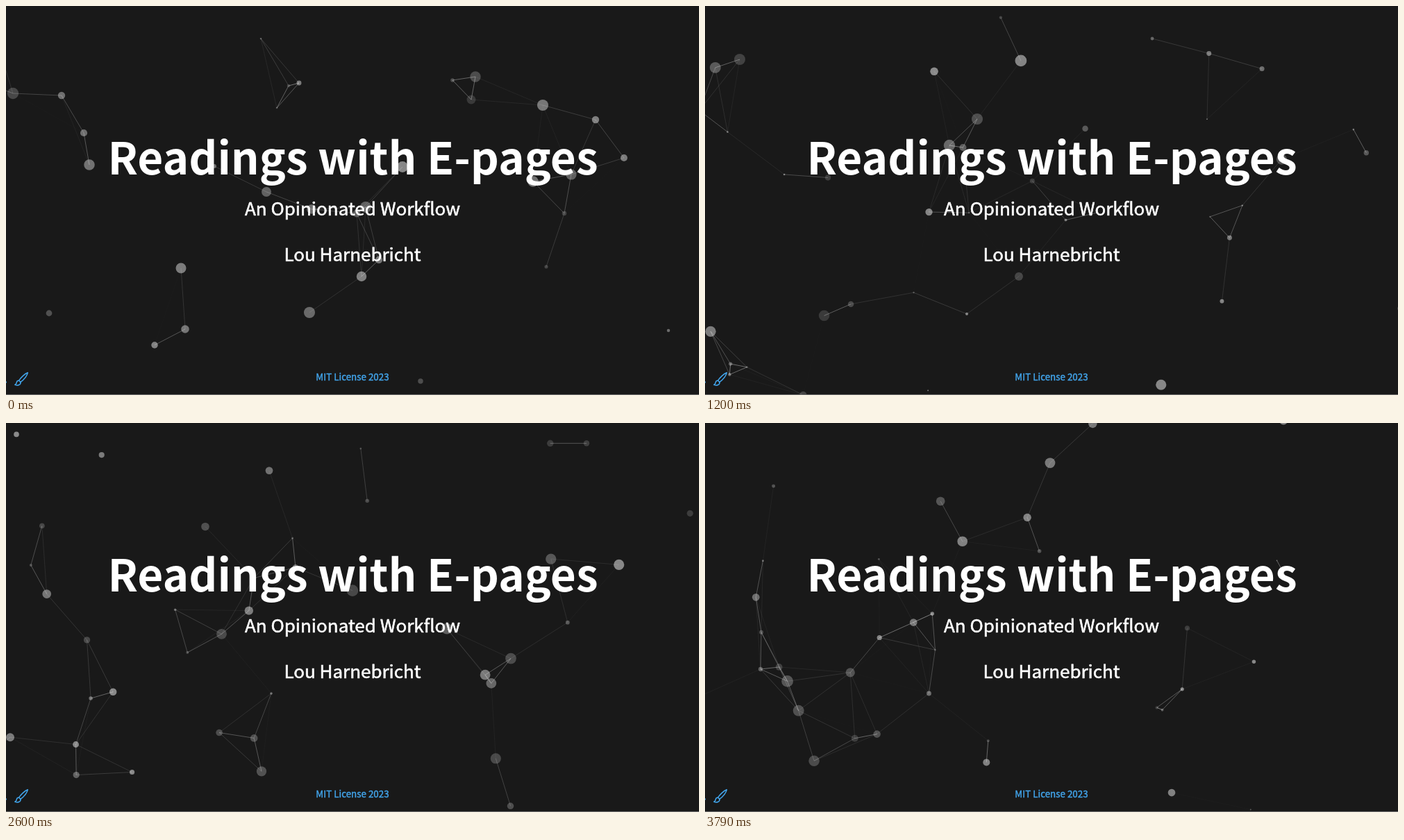
An HTML page with a canvas that plays this animation: 998 by 561 pixels, repeating every 3970 ms.

```html
<!DOCTYPE html>
<html lang="en">
<head>
<meta charset="utf-8">
<title>Slide</title>
<style>
html, body { margin: 0; width: 100%; height: 100%; overflow: hidden; background: #191919; }
canvas, svg { position: absolute; left: 0; top: 0; width: 998px; height: 561px; display: block; }
text { font-family: "Noto Sans CJK JP", "Noto Sans CJK SC", "Noto Sans CJK", "Open Sans", sans-serif; text-anchor: middle; fill: #fff; }
.title { font-size: 63.9px; font-weight: 700; }
.line { font-size: 26px; stroke: #fff; stroke-width: .6px; }
.foot { font-size: 13.4px; fill: #42a5ec; stroke: #42a5ec; stroke-width: .4px; }
.brush { fill: none; stroke: #42a5ec; stroke-width: 1.5; stroke-linejoin: round; stroke-linecap: round; }
</style>
</head>
<body>
<canvas id="net" width="998" height="561"></canvas>
<svg viewBox="0 0 998 561">
  <text class="title" x="499.5" y="243">Readings with E-pages</text>
  <text class="line" x="499" y="301.5">An Opinionated Workflow</text>
  <text class="line" x="499" y="368">Lou Harnebricht</text>
  <text class="foot" x="499" y="540">MIT License 2023</text>
  <g class="brush">
    <path d="M31.3 528.8C27 530.4 21 536.2 18.6 540.2L21 542.4C25.4 539 30.4 533.2 31.3 528.8Z"/>
    <path d="M18.6 540.2C15.6 539.8 15.2 542.6 15 544C14.6 545.6 13.6 546 12.8 546.2C16.4 548 21.6 546.6 21 542.4"/>
  </g>
  <rect x="0" y="541.5" width="1" height="2" fill="#42a5ec"/>
  <rect x="0" y="560" width="998" height="1" fill="#6a6a6a"/>
</svg>
<script>
const W = 998, H = 561, LOOP = 3970;
const SPEED = 50, REACH = 120, EDGE = 60;
const ctx = document.getElementById("net").getContext("2d");

// start x, start y, heading in degrees; all dots share one speed
const starts = [
  [10, 126, 68], [80, 129, 240], [112, 183, 88], [120, 229, 18],
  [62, 443, 154], [-46, 104, 51], [-17, 38, 58], [223, -52, 131],
  [252, 378, 36], [258, 466, 217], [214, 489, 225], [437, 442, 178],
  [597, 541, 5], [281, 599, -48], [26, 570, -55], [-21, 552, -20],
  [63, 570, 244], [107, 610, -55], [367, 47, 128], [407, 115, -37],
  [422, 111, 120], [390, 147, 108], [375, 268, 151], [440, 293, 175],
  [300, 231, -30], [571, 232, 247], [518, 290, 219], [505, 299, -1],
  [512, 390, 180], [537, 366, 253], [466, -28, 132], [643, 107, -89],
  [676, 102, -34], [670, 135, 28], [773, 143, -61], [849, 164, 108],
  [890, 219, -43], [814, 243, 132], [759, 253, 122], [804, 299, 144],
  [778, 376, 124], [954, 468, -32], [1012, 218, 186]
];

function seeded(s) {
  return () => (s = (s * 16807) % 2147483647) / 2147483647;
}

// triangle wave between lo and hi with its own phase and period
function pulse(rand, lo, hi) {
  const phase = rand() * 2, half = 1 + rand() * 1.6;
  return t => lo + (hi - lo) * Math.abs(1 - (t / half + phase) % 2);
}

const rand = seeded(2023);
const dots = starts.map(([x, y, deg]) => ({
  x, y,
  vx: SPEED * Math.cos(deg * Math.PI / 180),
  vy: SPEED * Math.sin(deg * Math.PI / 180),
  size: pulse(rand, .8, 8.4),
  alpha: pulse(rand, .14, .5)
}));

// dots may drift a little past the sides and still hold their lines
function place(t) {
  return dots
    .map(d => ({ x: d.x + d.vx * t, y: d.y + d.vy * t, r: d.size(t), alpha: d.alpha(t) }))
    .filter(p => p.x > -EDGE && p.x < W + EDGE && p.y > -p.r && p.y < H + p.r);
}

function link(a, b) {
  const d = Math.hypot(a.x - b.x, a.y - b.y);
  if (d >= REACH) return;
  ctx.strokeStyle = `rgba(255,255,255,${.45 * (1 - d / REACH)})`;
  ctx.beginPath();
  ctx.moveTo(a.x, a.y);
  ctx.lineTo(b.x, b.y);
  ctx.stroke();
}

function draw(t) {
  const ps = place(t);
  ctx.fillStyle = "#191919";
  ctx.fillRect(0, 0, W, H);
  ps.forEach((p, i) => ps.slice(i + 1).forEach(q => link(p, q)));
  for (const p of ps) {
    ctx.fillStyle = `rgba(255,255,255,${p.alpha})`;
    ctx.beginPath();
    ctx.arc(p.x, p.y, p.r, 0, Math.PI * 2);
    ctx.fill();
  }
}

// the picture moves in 100 ms steps and holds before the last one
function step(ms) {
  return ms >= 3790 ? 3790 : Math.min(3600, Math.floor(ms / 100) * 100);
}

function tick() {
  draw(step(performance.now() % LOOP) / 1000);
  requestAnimationFrame(tick);
}
tick();
</script>
</body>
</html>
```
